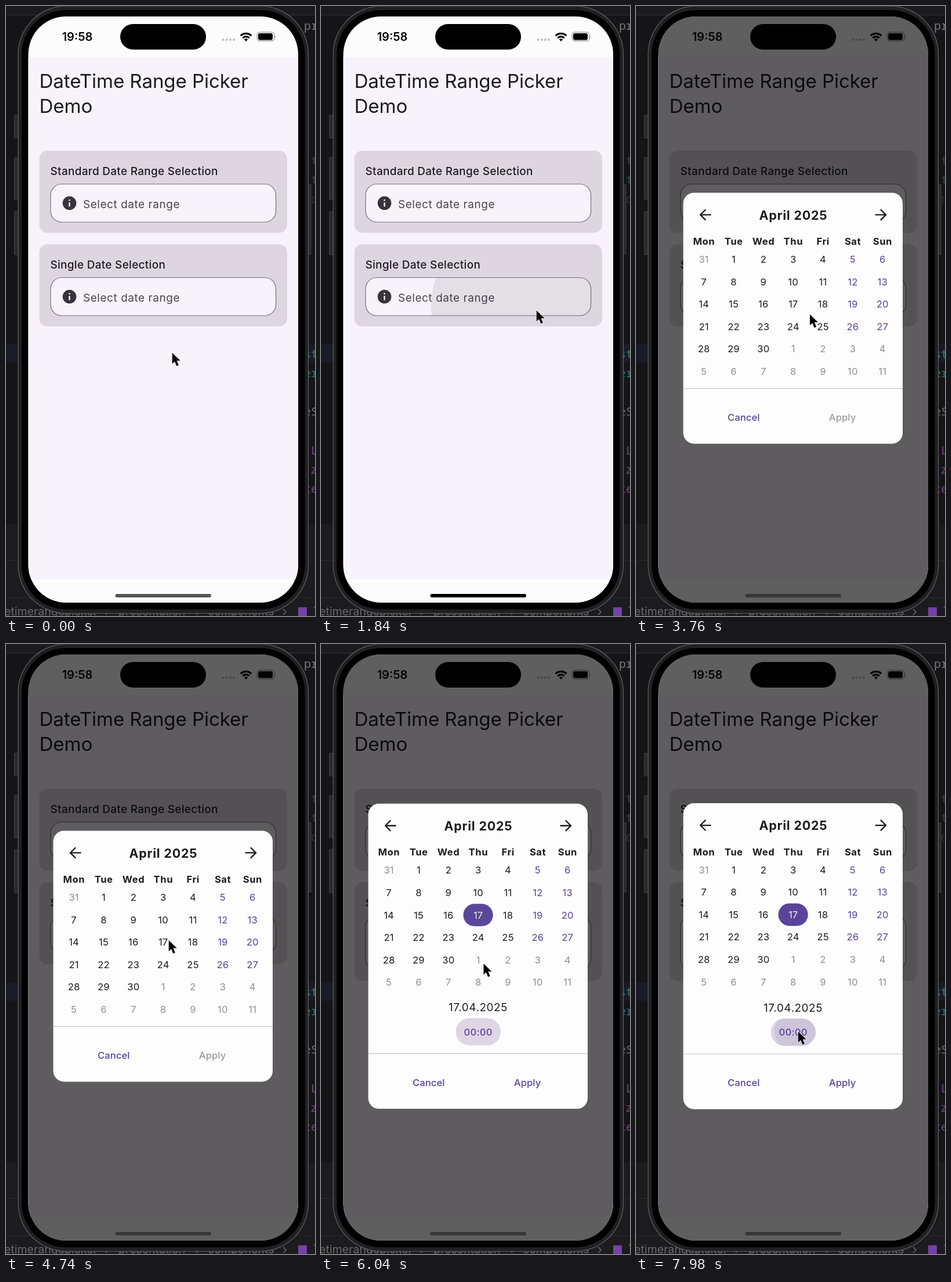
Animation of 533 by 1050 pixels, one loop 8 s. Source, as an HTML page:

```html
<!DOCTYPE html>
<html lang="en">
<head>
<meta charset="utf-8">
<title>Date picker demo</title>
<style>
html, body { margin: 0; width: 100%; height: 100%; overflow: hidden; background: #151518; }
#stage { display: block; width: 533px; height: 1050px; font-family: Inter, Roboto, sans-serif; }
.mid { text-anchor: middle; }
.code { font: 20px "Noto Sans Mono", "DejaVu Sans Mono", monospace; }
</style>
</head>
<body>
<svg id="stage" viewBox="0 0 533 1050">
  <defs>
    <clipPath id="screenClip"><rect x="38.5" y="18" width="465.5" height="1009" rx="65"/></clipPath>
    <clipPath id="fieldClip"><rect x="77" y="467.5" width="388.5" height="65.5" rx="19"/></clipPath>
    <clipPath id="timeClip"><rect x="232.5" y="-61" width="77.5" height="47" rx="23.5"/></clipPath>
  </defs>
  <g id="editor"></g>
  <g id="phone">
    <g fill="#2a2a2c" stroke="#434346">
      <rect x="14.5" y="188" width="8" height="39"/>
      <rect x="14.5" y="261" width="8" height="72"/>
      <rect x="14.5" y="354" width="8" height="74"/>
      <rect x="519" y="308" width="7" height="119"/>
    </g>
    <rect x="21" y="0" width="500.5" height="1045.5" rx="83" fill="#202022" stroke="#626264" stroke-width="1.2"/>
    <rect x="27" y="7" width="488.5" height="1031.5" rx="76"/>
  </g>
  <g clip-path="url(#screenClip)">
    <rect x="38" y="18" width="467" height="1010" fill="#fdfcfd"/>
    <rect x="38" y="88" width="467" height="899" fill="#f8f3fa"/>
    <g id="page"></g>
    <g clip-path="url(#fieldClip)"><circle id="fieldRipple"/></g>
    <g id="status"></g>
    <rect id="scrim" x="38" y="18" width="467" height="1010"/>
    <rect id="home" x="188.5" y="1012" width="165.5" height="6" rx="3"/>
    <rect x="197" y="31" width="148" height="44" rx="22"/>
    <g id="dialog">
      <rect id="sheet" x="81.5" width="378.5" rx="18.5" fill="#fdfdfd"/>
      <g id="calendar"></g>
      <svg id="section" y="327" width="533">
        <g id="time"></g>
      </svg>
      <g id="footer"></g>
    </g>
  </g>
  <path id="cursor" d="M.7 1V20l4.3-4.1 3.4 7.9 3.5-1.5-3.4-7.7h6.2Z" stroke="#fff" stroke-width="1.5" paint-order="stroke" stroke-linejoin="round"/>
</svg>
<script>
const LOOP = 8000, PURPLE = '#58449a', INK = '#1d1b20';
const $ = id => document.getElementById(id);
const set = (id, attrs) => { for (const k in attrs) $(id).setAttribute(k, attrs[k]); };
const text = (s, x, y, size, extra = '') =>
  `<text x="${x}" y="${y}" font-size="${size}" ${extra}>${s}</text>`;
// Centred on both axes; the baseline sits half a cap height below the middle.
const label = (s, x, y, size, fill, weight = 400, spacing = 0.2) =>
  text(s, x + spacing / 2, y + size * 0.364, size,
    `class="mid" fill="${fill}" font-weight="${weight}" letter-spacing="${spacing}"`);

// Editor behind the phone
const fragments = [
  ['pr', 514, 41, '#77777a'], ['t', 526, 273, '#30483f', 1], ['t', 526, 306, '#30483f', 1],
  ['d', 526, 339, '#343437', 1], ['st', 514, 606, '#3b7d69'], ['er', 514, 639, '#2f7377'],
  ['eS', 514, 705, '#6d6d70', 1], ['L', 526, 772, '#77457f'], ['z', 525, 805, '#77457f'],
  ['te', 514, 838, '#77457f']
];
$('editor').innerHTML = `
  <rect width="533" height="1050" fill="#151518"/>
  <rect width="533" height="15" fill="#1b1b1f"/><rect y="15" width="533" height="1" fill="#303038"/>
  <rect y="582" width="533" height="32" fill="#191c25"/>
  <rect y="892" width="533" height="158" fill="#1c1c1f"/>
  <path d="M0 954.5H533M0 1018.5H533" stroke="#2b2b2f"/>` +
  fragments.map(([s, x, y, c, italic]) =>
    text(s, x, y, 20, `class="code" fill="${c}" ${italic ? 'font-style="italic"' : ''}`)).join('') +
  [['etimerangepicker', -3], ['presentation', 194], ['components', 348], ['T', 530]].map(([s, x]) =>
    text(s, x, 1049, 19.5, 'fill="#68686b"')).join('') +
  `<path d="M172 1038l5 5-5 5M328 1038l5 5-5 5M478 1038l5 5-5 5" fill="none" stroke="#68686b" stroke-width="1.5"/>
  <rect x="504" y="1035" width="15" height="15" fill="#7441a8"/>`;

// Page
const card = (y, title, id) => `
  <rect id="${id}Card" x="57.5" y="${y}" width="427.5" height="141.5" rx="14" fill="#ddd6e1"/>
  ${text(title, 76.5, y + 41.5, 18.9, `fill="${INK}" font-weight="500" letter-spacing=".33"`)}
  <rect id="${id}Field" x="77" y="${y + 57.5}" width="388.5" height="65.5" rx="19" fill="#f8f3fa" stroke="#77727d" stroke-width="1.2"/>
  <circle cx="109.5" cy="${y + 90.3}" r="11.8" fill="#37333d"/>
  <path d="M109.5 ${y + 84}v2.4M109.5 ${y + 89}v7.2" stroke="#f8f3fa" stroke-width="2.4"/>
  ${text('Select date range', 133, y + 98.5, 18.9, 'fill="#49454f" letter-spacing=".59"')}`;
const heading = (s, y) => text(s, 57.5, y, 33.1, `fill="${INK}" letter-spacing="-.08"`);
$('page').innerHTML = heading('DateTime Range Picker', 141) + heading('Demo', 184) +
  card(249, 'Standard Date Range Selection', 'range') + card(410, 'Single Date Selection', 'single');

$('status').innerHTML = label('19:58', 123, 53, 20, '#000', 600, 0) +
  [374.5, 380.8, 387, 393].map(x => `<circle cx="${x}" cy="58" r="2.2" fill="#c8c4c0"/>`).join('') + `
  <path d="M404.7 51.2a13.2 13.2 0 0 1 18.6 0M408.3 55.1a8 8 0 0 1 11.4 0" fill="none" stroke="#000" stroke-width="3.2"/>
  <path d="M414 61l-3.2-3.4a4.6 4.6 0 0 1 6.4 0Z"/>
  <rect x="433.2" y="45.2" width="29.6" height="15" rx="4.6" fill="none" stroke="#8f8d90" stroke-width="1.2"/>
  <rect x="435" y="47" width="25" height="11.5" rx="3"/><path d="M464.3 50.5q2 2 0 4.5Z" fill="#8f8d90"/>`;

// Dialog
const colX = c => 117 + 51.35 * c, rowY = r => 114.6 + 38.6 * r;
let cal = label('April 2025', 271, 38.5, 21.3, INK, 700, 0.9) +
  `<path d="M129.5 38H111.5M120.2 28.8L111 38l9.2 9.2M412.5 38h18M421.8 28.8L431 38l-9.2 9.2" fill="none" stroke="${INK}" stroke-width="2.3"/>` +
  `<rect id="chosen" x="245.4" y="${rowY(2) - 19.3}" width="51.3" height="38.6" rx="19.3" fill="${PURPLE}"/>`;
['Mon', 'Tue', 'Wed', 'Thu', 'Fri', 'Sat', 'Sun'].forEach((d, c) => {
  cal += label(d, colX(c), 83.5, 16.56, INK, 700, 0.6);
});
for (let i = 0; i < 42; i++) {
  const inMonth = i > 0 && i < 31, c = i % 7, r = Math.floor(i / 7);
  const fill = !inMonth ? '#909092' : c > 4 ? PURPLE : INK;
  cal += label(i ? (i > 30 ? i - 30 : i) : 31, colX(c), rowY(r), 16.56, fill, 400, 0.2);
}
$('calendar').innerHTML = cal + `<g id="chosenText">${label(17, colX(3), rowY(2), 16.56, '#fff')}</g>`;
$('time').innerHTML = label('17.04.2025', 270.7, -79.5, 18.9, INK, 400, 0.6) + `
  <rect x="232.5" y="-61" width="77.5" height="47" rx="23.5" fill="#ddd6e3"/>
  <g clip-path="url(#timeClip)"><circle id="timeRipple" fill="${PURPLE}"/></g>` +
  label('00:00', 271, -37.5, 16.56, PURPLE, 500, 0.3);
const button = (s, x, fill) => label(s, x, -45.6, 16.56, fill, 500, 0.1);
$('footer').innerHTML = '<path d="M81.5-95H460" stroke="#c8c4cb" stroke-width="1.2"/>' +
  button('Cancel', 185.7, PURPLE) +
  `<g id="applyOff">${button('Apply', 356, '#9d9b9f')}</g><g id="applyOn">${button('Apply', 356, PURPLE)}</g>`;

// Motion
const clamp = v => Math.min(1, Math.max(0, v));
const span = (t, a, b) => clamp((t - a) / (b - a));
const mix = (a, b, k) => a + (b - a) * k;
const smooth = k => k * k * (3 - 2 * k);
// cubic-bezier(.4, 0, .2, 1)
function standard(x) {
  let lo = 0, hi = 1, s = 0.5;
  for (let i = 0; i < 16; i++) {
    s = (lo + hi) / 2;
    1.2 * (1 - s) ** 2 * s + 0.6 * (1 - s) * s * s + s ** 3 < x ? lo = s : hi = s;
  }
  return smooth(s);
}
function spring(ms, omega) {
  const x = Math.max(0, ms) * omega / 1000;
  return 1 - (1 + x) * Math.exp(-x);
}
function ripple(id, ms, from, to, r0, r1, alpha) {
  const k = clamp(ms / 225);
  set(id, {
    cx: mix(from[0], to[0], k), cy: mix(from[1], to[1], k),
    r: mix(r0, r1, standard(k)), opacity: alpha * clamp(ms / 75)
  });
}

// start, end, x, y
const moves = [
  [680, 1480, 371, 523], [1960, 2780, 315, 547],
  [3200, 4400, 280, 509], [5700, 6730, 279, 666]
];
function draw(t) {
  let x = 286, y = 596;
  for (const [a, b, mx, my] of moves) {
    const k = smooth(span(t, a, b));
    x = mix(x, mx, k);
    y = mix(y, my, k);
  }
  set('cursor', { transform: `translate(${x} ${y})` });

  const open = smooth(span(t, 1950, 2160));
  ripple('fieldRipple', t - 1773, [371, 523], [271, 500], 116, 209, 0.09 * (1 - open));
  set('scrim', { 'fill-opacity': 0.62 * open });
  set('home', { 'fill-opacity': mix(mix(0.66, 1, span(t, 20, 140)), 0.42, open) });

  const picked = t >= 5260, p = spring(t - 5260, 7.95);
  const height = 432 + 94.7 * p, zoom = mix(0.9, 1, open);
  set('singleCard', { height: picked ? 170 : 141.5 });
  set('singleField', { height: picked ? 94 : 65.5 });
  set('dialog', {
    opacity: open,
    transform: `translate(271 537.4) scale(${zoom}) translate(-271 ${-height / 2})`
  });
  set('sheet', { height });
  set('section', { height: height - 422 });
  set('time', { transform: `translate(0 ${height - 422})`, opacity: p });
  set('footer', { transform: `translate(0 ${height})` });
  for (const id of ['chosen', 'chosenText', 'applyOn']) set(id, { opacity: p });
  set('applyOff', { opacity: 1 - p });
  ripple('timeRipple', t - 7908, [279, -39], [271, -37.5], 23, 57, 0.12);
}
function tick() {
  draw(performance.now() % LOOP);
  requestAnimationFrame(tick);
}
tick();
</script>
</body>
</html>
```
